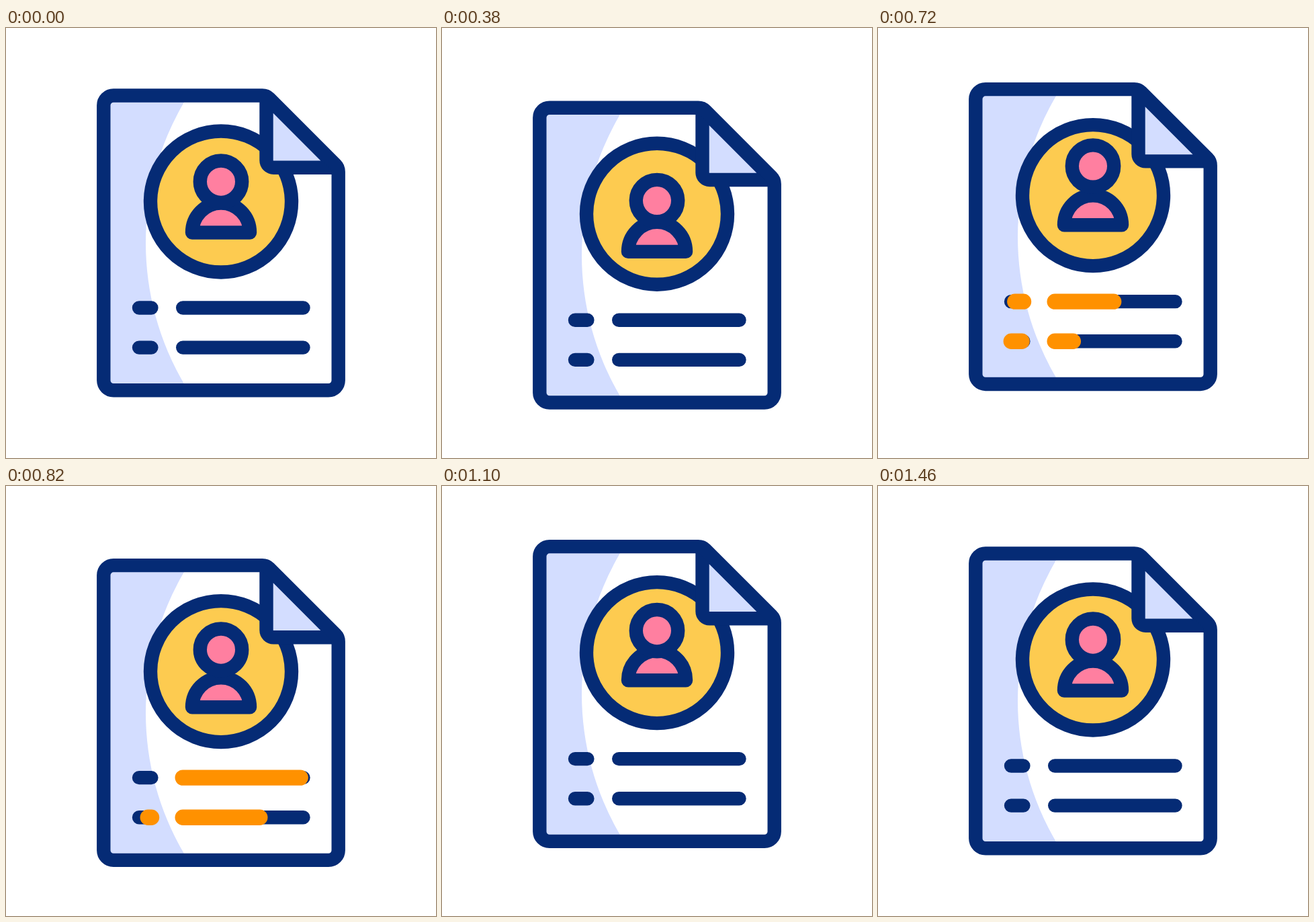
Write an HTML page that moves like this. It is 640 px wide and 640 px high and loops after 1560 ms.

```html
<!DOCTYPE html>
<html lang="en">
<head>
<meta charset="utf-8">
<title>Profile document</title>
<style>
  html, body { margin: 0; width: 100%; height: 100%; overflow: hidden; background: #fff; }
  svg { display: block; width: 100%; height: 100%; }
  .ink { stroke: #052b75; stroke-width: 20.4; stroke-linecap: round; stroke-linejoin: round; fill: none; }
  .pale { fill: #d3ddff; }
  .pink { fill: #ff7fa0; }
  .sweep { stroke: #ff9100; stroke-width: 23.4; stroke-linecap: round; }
</style>
</head>
<body>
<svg viewBox="0 0 640 640">
  <g id="page">
    <path class="pale" d="M147 102H270L265 110.5A413.5 413.5 0 0 0 265 529.5L270 538H147Z"/>
    <circle class="ink" style="fill:#fdcb50" cx="320" cy="258.5" r="105"/>
    <g id="body"><path class="ink pink" style="fill:#ff7fa0" d="M277 304.5A43 44 0 0 1 363 304.5Z"/></g>
    <g id="head"><circle class="ink pink" style="fill:#ff7fa0" cx="320" cy="228.7" r="31.2"/></g>
    <path class="ink" style="fill:#d3ddff" d="M387.5 102V197a10.7 10.7 0 0 0 10.7 10.7H493Z"/>
    <path class="ink" d="M381.5 100.5H160a14.7 14.7 0 0 0-14.7 14.7V524.6a14.7 14.7 0 0 0 14.7 14.7H480a14.7 14.7 0 0 0 14.7-14.7V214Q494.7 207.7 490.4 203.4L391.8 104.8Q387.5 100.5 381.5 100.5Z"/>
    <path class="ink" d="M198 416.5h18.4M263.2 416.5h179.3M198 475.6h18.4M263.2 475.6h179.3"/>
  </g>
</svg>
<script>
  const LOOP = 1560, STEP = 20;
  const $ = id => document.getElementById(id);
  const clamp = x => Math.min(1, Math.max(0, x));
  const ease = x => x * x * (3 - 2 * x);

  // Vertical offsets as [ms, px]; head and body move relative to the page.
  const moves = {
    page: [[200, 0], [420, 20], [590, -38], [852, 20], [1090, -10.4], [1455, 0]],
    body: [[200, 0], [395, 10.3], [632, -6.3], [895, 10.5], [1120, -5.3], [1455, 0]],
    head: [[200, 0], [395, 10.3], [715, -13.8], [930, 9.3], [1150, -5], [1455, 0]]
  };

  // Each sweep grows from the left, then shrinks to the right.
  const sweeps = [
    { x: 198.3, w: 18.2, y: 416.5, start: 570, dur: 115 },
    { x: 263.2, w: 179.3, y: 416.5, start: 620, dur: 205 },
    { x: 198.3, w: 18.2, y: 475.6, start: 618, dur: 118 },
    { x: 263.2, w: 179.3, y: 475.6, start: 689, dur: 205 }
  ];
  for (const s of sweeps) {
    s.line = document.createElementNS("http://www.w3.org/2000/svg", "line");
    s.line.setAttribute("class", "sweep");
    s.line.setAttribute("y1", s.y);
    s.line.setAttribute("y2", s.y);
    $("page").append(s.line);
  }

  function offset(keys, t) {
    let y = keys[0][1];
    for (let i = 1; i < keys.length; i++) {
      const [t0, y0] = keys[i - 1], [t1, y1] = keys[i];
      if (t >= t0) y = y0 + (y1 - y0) * ease(clamp((t - t0) / (t1 - t0)));
    }
    return y;
  }

  function draw(now) {
    const t = Math.floor(now % LOOP / STEP) * STEP;
    for (const id in moves) $(id).setAttribute("transform", `translate(0 ${offset(moves[id], t)})`);
    for (const { x, w, start, dur, line } of sweeps) {
      const p = (t - start) / dur;
      line.setAttribute("x1", x + w * clamp(p - 1));
      line.setAttribute("x2", x + w * clamp(p));
      line.style.display = p > 0 && p < 2 ? "" : "none";
    }
  }

  const begin = performance.now();
  function tick() {
    draw(performance.now() - begin);
    requestAnimationFrame(tick);
  }
  tick();
</script>
</body>
</html>
```
